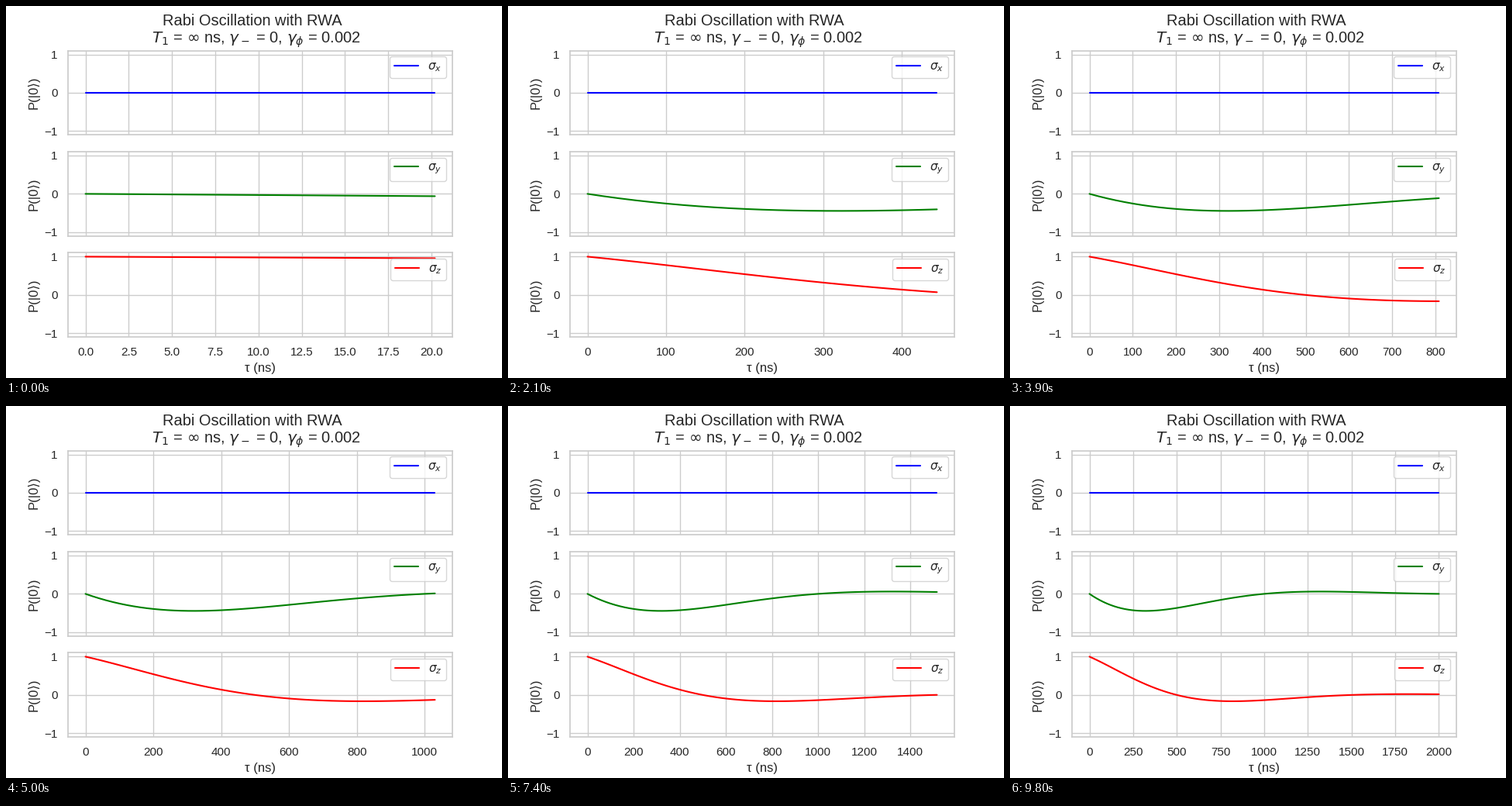
Animation, 640 px wide and 480 px high, one loop 9900 ms. Source, as a matplotlib script:

```python
import numpy as np
import matplotlib.pyplot as plt
from matplotlib.animation import FuncAnimation

INK, GRID = "0.15", "0.8"
plt.rcParams.update({
    "font.family": ["Liberation Sans", "DejaVu Sans"],
    "font.size": 12,
    "text.color": INK,
    "axes.labelcolor": INK,
    "axes.labelsize": 12,
    "axes.edgecolor": GRID,
    "axes.linewidth": 1.25,
    "axes.axisbelow": True,
    "axes.grid": True,
    "grid.color": GRID,
    "grid.linewidth": 1,
    "lines.linewidth": 1.5,
    "lines.solid_capstyle": "round",
    "legend.fontsize": 11,
    "figure.titlesize": 14.4,
})
for axis in "xy":
    plt.rcParams.update({
        f"{axis}tick.color": INK,
        f"{axis}tick.labelsize": 11,
        f"{axis}tick.major.size": 6,
        f"{axis}tick.major.width": 1.25,
    })
plt.rcParams.update({"xtick.bottom": False, "ytick.left": False})

GAMMA = 0.002
OMEGA = np.pi / 1000
STEPS = 99

# Damped Bloch vector starting at the pole
times = np.linspace(0, 2000, STEPS + 1)
decay = np.exp(-GAMMA * times)
curves = [
    0 * times,
    -decay * np.sin(OMEGA * times),
    decay * np.cos(OMEGA * times),
]

fig, axes = plt.subplots(3, 1, sharex=True, figsize=(6.4, 4.8), dpi=100)
fig.suptitle("Rabi Oscillation with RWA \n"
             r" $T_1$ = $\infty$ ns, $\gamma_-$ = 0, $\gamma_\phi$ = 0.002")

lines = []
for ax, color, name in zip(axes, ("blue", "green", "red"), "xyz"):
    line, = ax.plot([], [], color=color, label=rf"$\sigma_{name}$")
    lines.append(line)
    ax.set_ylim(-1.1, 1.1)
    ax.set_yticks([-1, 0, 1])
    ax.set_ylabel("P(|0⟩)")
    ax.legend(loc="best")
axes[-1].set_xlabel("τ (ns)")


def update(step):
    count = step + 2
    end = times[count - 1]
    for line, curve in zip(lines, curves):
        line.set_data(times[:count], curve[:count])
    axes[0].set_xlim(-0.05 * end, 1.05 * end)
    return lines


anim = FuncAnimation(fig, update, frames=STEPS, interval=100,
                     init_func=lambda: update(0), repeat=True)
plt.show()
```
